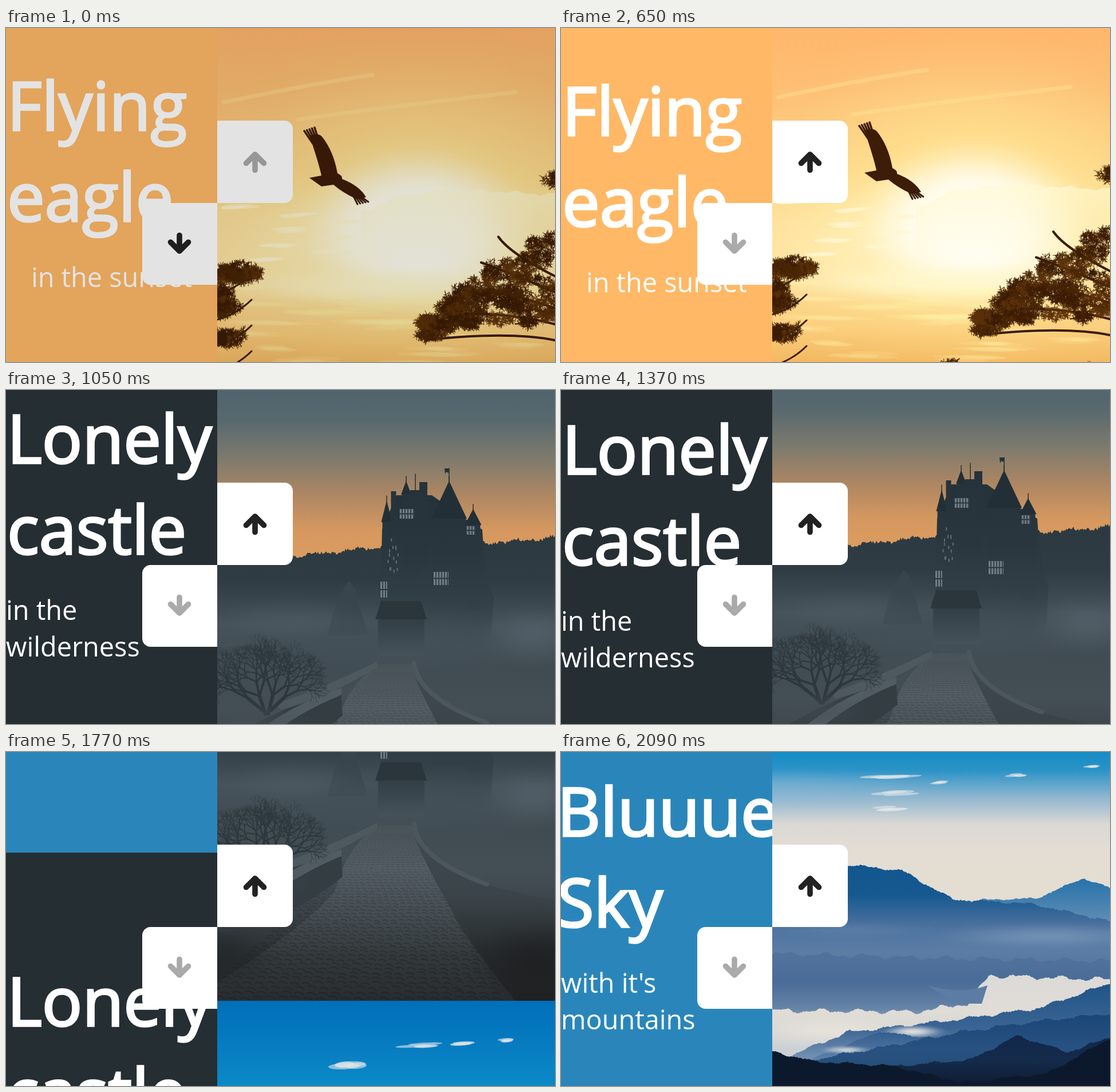
Recreate the animation shown at these times as an HTML page with a canvas. Size 959 by 584 pixels, loop 2.17 s.

```html
<!DOCTYPE html>
<html lang="en">
<head>
<meta charset="utf-8">
<title>Double vertical slider</title>
<style>
  * { box-sizing: border-box; margin: 0; padding: 0; }
  html, body { width: 100%; height: 100%; overflow: hidden; }
  body { font-family: "Open Sans", sans-serif; }
  #stage { position: absolute; inset: 0; overflow: hidden; background: #252e33; }
  .side { position: absolute; top: 0; height: 584px; overflow: hidden; }
  #left { left: 0; width: 369px; }
  #right { left: 369px; width: 590px; }
  .track { position: absolute; left: 0; top: -156px; width: 100%; }
  .panel {
    position: absolute; top: calc(var(--i) * -923px); width: 369px; height: 923px; color: #fff;
    display: flex; flex-direction: column; align-items: center; justify-content: center;
  }
  h1 {
    position: relative; left: 2px; top: -1.8px;
    font-size: 117px; font-weight: 400; line-height: 159px;
    margin: -87.75px 0 29.25px; -webkit-text-stroke: 3.66px #fff;
  }
  p { font-size: 46.8px; line-height: 64px; }
  canvas { display: block; width: 590px; height: 923px; }
  .btn {
    position: absolute; width: 131.5px; height: 143.5px; background: #fff;
    display: flex; align-items: center; justify-content: center;
  }
  #up { left: 369px; top: 162px; border-radius: 0 14.6px 14.6px 0; }
  #down { left: 237.7px; top: 305.5px; border-radius: 14.6px 0 0 14.6px; }
  #down svg { transform: scaleY(-1); }
  .btn svg {
    width: 42px; height: 42px; fill: none; stroke: currentColor;
    stroke-width: 9.6px; stroke-linecap: round; stroke-linejoin: round;
  }
  #shade { position: absolute; inset: 0; background: #000; opacity: .11; }
</style>
</head>
<body>
<div id="stage">
  <div class="side" id="left"><div class="track">
    <div class="panel" style="--i:0;background:#ffb866"><h1>Flying eagle</h1><p>in the sunset</p></div>
    <div class="panel" style="--i:1;background:#252e33"><h1>Lonely castle</h1><p>in the wilderness</p></div>
    <div class="panel" style="--i:2;background:#2a86ba"><h1>Bluuue Sky</h1><p>with it's mountains</p></div>
  </div></div>
  <div class="side" id="right"><div class="track">
    <canvas width="590" height="923"></canvas>
    <canvas width="590" height="923"></canvas>
    <canvas width="590" height="923"></canvas>
  </div></div>
  <div class="btn" id="down"><svg viewBox="-21 -21 42 42"><use href="#arrow"/></svg></div>
  <div class="btn" id="up"><svg viewBox="-21 -21 42 42"><path id="arrow" d="M-15.500 2.500 0-13 15.500 2.500M0-12V14.500"/></svg></div>
  <div id="shade"></div>
</div>
<script>
const $ = s => document.querySelector(s);
const TOP = -156, H = 923, BOTTOM = TOP + H, L = 369, R = 959, LOOP = 2170;

// ---- drawing helpers (all scenes use stage coordinates) ----
let c, seed;
const rnd = () => (seed = (seed * 16807) % 2147483647) / 2147483647;
const spread = a => (rnd() * 2 - 1) * a;
const between = (a, b) => a + rnd() * (b - a);
const times = (n, f) => { for (let i = 0; i < n; i++) f(i); };

// Vertical gradient with evenly spaced colours
function vgrad(y0, y1, ...cols) {
  const g = c.createLinearGradient(0, y0, 0, y1);
  cols.forEach((col, i) => g.addColorStop(i / (cols.length - 1), col));
  return g;
}

function fill(path, col) {
  c.fillStyle = col;
  c.fill(new Path2D(path));
}

function stroke(path, col, w) {
  c.strokeStyle = col;
  c.lineWidth = w;
  c.stroke(new Path2D(path));
}

function glow(x, y, rx, ry, rgb, a) {
  c.save();
  c.translate(x, y);
  c.scale(rx, ry);
  const g = c.createRadialGradient(0, 0, 0, 0, 0, 1);
  times(9, i => g.addColorStop(i / 8, `rgba(${rgb},${a * (1 + Math.cos(Math.PI * i / 8)) / 2})`));
  c.fillStyle = g;
  c.fillRect(-1, -1, 2, 2);
  c.restore();
}

// Land below a line through key points "x,y", roughened by waves and jitter
function ridge(keys, col, wave = 2, jitter = 1, base = BOTTOM) {
  const pts = keys.split(' ').map(p => p.split(',').map(Number));
  const phase = rnd() * 9;
  c.beginPath();
  c.moveTo(pts[0][0], base);
  for (let i = 0, x = pts[0][0]; x <= R + 2; x += 2) {
    while (i < pts.length - 2 && x > pts[i + 1][0]) i++;
    const [x0, y0] = pts[i], [x1, y1] = pts[i + 1], k = (x - x0) / (x1 - x0);
    const bump = Math.sin(x * .09 + phase) + Math.sin(x * .21 + phase * 2) * .6;
    c.lineTo(x, y0 + (y1 - y0) * k + bump * wave + spread(jitter));
  }
  c.lineTo(R + 2, base);
  c.fillStyle = col;
  c.fill();
}

// Wispy cloud
function wisp(x, y, rx, ry, col, tilt = -.05) {
  times(4, () => {
    c.beginPath();
    c.ellipse(x + spread(rx * .4), y + spread(ry * .5), rx * between(.4, .7), ry * .5, tilt, 0, 7);
    c.fillStyle = col;
    c.fill();
  });
}

// Clumps of needles scattered between two height curves
function foliage(x0, x1, top, bottom, clumps) {
  times(clumps, () => {
    const cx = between(x0, x1), cy = between(top(cx), bottom(cx));
    c.beginPath();
    times(24, () => {
      const a = rnd() * 6.283, r = Math.sqrt(rnd());
      const px = cx + Math.cos(a) * r * 17, py = cy + Math.sin(a) * r * 10;
      times(7, () => {
        const b = rnd() * 6.283, l = between(3, 8);
        c.moveTo(px, py);
        c.lineTo(px + Math.cos(b) * l, py + Math.sin(b) * l);
      });
    });
    c.strokeStyle = ['#4a2606', '#3c1c04', '#5c310b'][Math.floor(rnd() * 3)];
    c.lineWidth = .9;
    c.stroke();
  });
}

function branch(x, y, ang, len, w) {
  const x2 = x + Math.cos(ang) * len, y2 = y + Math.sin(ang) * len;
  stroke(`M${x} ${y}L${x2} ${y2}`, '#2d373d', w);
  if (len < 7) return;
  const n = rnd() < .3 ? 3 : 2;
  times(n, i => branch(x2, y2, ang + (i - (n - 1) / 2) * .75 + spread(.25), len * between(.68, .86), w * .68));
}

// ---- scenes ----
function sunset() {
  c.fillStyle = vgrad(0, 640, '#ffb56c', '#fdbe73', '#fdcd80', '#fedc94', '#ffe3a0', '#fbcd7c', '#eda94c');
  c.fillRect(L, TOP, R - L, H);
  glow(720, 320, 430, 330, '255,232,150', .9);
  glow(700, 385, 430, 150, '255,246,200', .9);
  times(2, () => glow(720, 350, 220, 160, '255,255,248', 1));

  // long streaks, then the cloud bank in front of the sun
  times(2, i => stroke(`M${380 + i * 130} ${130 + i * 30}q140 ${-30 + i * 10} ${260 + i * 120} -48`, 'rgba(255,228,150,.4)', 7));
  ridge('620,322 690,292 790,282 870,287 959,291', vgrad(280, 420, 'rgba(255,250,215,.7)', 'rgba(255,240,180,0)'), 2, 1, 420);
  times(8, i => wisp(L + 40 + (i * 97) % 210, 314 + i * 13, 40, 6, 'rgba(255,248,212,.5)'));
  times(26, () => wisp(between(400, 900), between(440, 590), between(50, 110), 7, 'rgba(255,238,170,.16)', .03));
  glow(640, 452, 330, 40, '255,248,205', .8);

  ridge('369,656 620,655 760,665 959,668', vgrad(650, 725, '#d79a48', '#b5702a', '#94501a'), 3, 4);
  ridge('369,698 540,700 600,676 650,690 959,694', vgrad(670, BOTTOM, '#a5642a', '#8c4a15', '#6f3609'), 3, 2);

  // right-hand pine: boughs reach in from the edge
  times(5, i => stroke(`M959 ${546 - i * 28}Q880 ${530 - i * 34} ${740 + i * 30} ${545 - i * 45}`, '#3b1c05', 4));
  times(3, i => stroke(`M959 ${670 - i * 22}Q${850 + i * 20} ${630 - i * 8} ${670 + i * 90} ${612 - i * 4}`, '#3b1c05', 4));
  stroke('M890 660Q830 680 780 734', '#3b1c05', 3);
  const inward = x => (R - x) / 235;
  foliage(728, R, x => 355 + 165 * inward(x) ** 1.3, x => 512 + 30 * inward(x), 105);
  foliage(952, 965, () => 262, () => 272, 3);
  foliage(665, R, x => 596 + 18 * Math.sin(inward(x) * 2.6), x => 666 - 34 * inward(x), 72);
  foliage(770, 795, () => 730, () => 738, 3);
  foliage(930, R, () => 740, () => BOTTOM, 10);

  // left-hand pine and bush
  times(4, i => stroke(`M369 ${465 + i * 45}q35 -10 60 -35`, '#3b1c05', 3));
  [[430, 78], [465, 30], [492, 42], [543, 52], [628, 58]].forEach(([y, w]) =>
    foliage(L, L + w - 14, () => y - 13, () => y + 9, w / 4.5));
  foliage(L, 460, () => 697, x => BOTTOM - (x - L) * .2, 40);

  // eagle: body and wings, then fanned wing-tip feathers
  const bird = '#3d1c08';
  fill('M530 188Q545 182 552 190 572 215 579 254 588 258 587 264 618 276 629 296L612 299Q588 288 572 274L551 277 530 262 551 258Q546 235 530 188Z', bird);
  times(5, i => {
    stroke(`M${536 + i * 3} 202L${521 + i * 4.500} ${180 - i * 1.500}`, bird, 3.5);
    stroke(`M${607 + i * 3} 294L${614 + i * 4.700} ${308 - i}`, bird, 3);
  });
}

function tower(x, y, w, roof, h = 150) {
  const wall = vgrad(130, 400, '#26323a', '#2a363d', '#38444b');
  fill(`M${x - w / 2} ${y}h${w}v${h}h${-w}z`, wall);
  if (!roof) return;
  fill(`M${x - w / 2 - 2} ${y}h${w + 4}L${x} ${y - roof}z`, '#232f36');
  stroke(`M${x} ${y - roof + 4}v-12`, '#26323a', 1.5);
}

function lattice(x, y, w, h) {
  c.fillStyle = '#6f7c84';
  c.fillRect(x, y, w, h);
  for (let k = 0; k <= w; k += 5) stroke(`M${x + k} ${y}v${h}`, '#2a363d', 1.6);
  stroke(`M${x} ${y + h / 2}h${w}`, '#2a363d', 2);
}

function castle() {
  c.fillStyle = vgrad(TOP, 290, '#2c4d65', '#415a69', '#4f636d', '#58696e', '#7c7a6d', '#ac8663', '#d6985f', '#dd9d60');
  c.fillRect(L, TOP, R - L, H);
  ridge('369,274 500,271 650,256 850,248 959,239',
    vgrad(240, BOTTOM, '#2c3940', '#303c43', '#46525a', '#404b52', '#444e55', '#3a4246', '#292d30', '#222527'), 2, 3);

  fill('M598 315Q612 322 616 355L632 410H562Q572 355 598 315z', '#39454c');
  fill('M657 225L682 165H744L800 205 832 225Q836 300 852 345L846 430H652z', vgrad(165, 430, '#26323a', '#2a363d', '#323e45', '#434f56'));
  tower(665, 212, 15, 38, 45);
  tower(677, 158, 9, 0, 60);
  tower(699, 164, 14, 24);
  tower(715, 156, 18, 0);
  tower(729, 142, 14, 0);
  tower(774, 206, 58, 66);
  tower(816, 217, 25, 28);
  stroke('M774 145V118M715 158V128', '#26323a', 1.5);
  fill('M766 118h9l-2 8-4-2-2 4z', '#26323a');
  lattice(687, 189, 26, 17);
  lattice(746, 299, 27, 23);
  lattice(804, 219, 16, 15);
  lattice(653, 316, 13, 28);
  times(14, () => stroke(`M${between(666, 690)} ${between(240, 300)}v4`, '#5f6c73', 2));
  glow(690, 425, 330, 75, '68,80,88', .9);
  fill('M655 350H725L735 382H645z', '#2b363c');
  fill('M650 382H731V445H650z', vgrad(382, 445, '#333f46', '#465259'));
  glow(920, 410, 110, 60, '96,110,120', .4);
  glow(500, 385, 170, 45, '84,97,105', .35);

  // road narrowing towards the gate, with cobbles in perspective
  fill('M650 460H712Q725 520 768 575 775 640 900 767H369V735Q520 640 575 575 592 500 650 460z',
    vgrad(460, BOTTOM, '#485259', '#535d63', '#464e53', '#33383b', '#282c2f'));
  for (let y = 475; y < BOTTOM; y += 3 + (y - 470) / 48) {
    const k = (y - 460) / 300;
    for (let x = 651 - k * 310 + rnd() * 9; x < 715 + k * 150; x += 5 + k * 17)
      stroke(`M${x} ${y + spread(2 * k)}q${1.5 + k * 6} ${-4 * k} ${3 + k * 12} ${3 * k}`,
        `rgba(26,31,34,${.12 + k * .35})`, .8 + k * 1.4);
  }

  // parapets on both sides
  fill('M369 600Q490 530 585 505L588 550Q490 630 369 650z', '#343d42');
  fill('M430 585Q500 530 586 502V514Q510 545 455 590z', '#515c62');
  fill('M470 530Q560 500 648 456V466Q560 520 480 540z', '#4e595f');
  fill('M712 480Q760 560 959 590V767H890Q790 650 712 480z', vgrad(500, BOTTOM, '#3e484e', '#3a4348', '#282c2e', '#1f2122'));
  stroke('M713 458Q720 520 840 563', '#4c565d', 8);
  glow(930, 700, 140, 90, '28,30,31', .7);
  glow(L, 690, 110, 70, '34,39,42', .7);

  times(4, i => branch(448 + i * 5, 550 - Math.abs(i - 1.5) * 6, -2.45 + i * .56, 33, 6));
  glow(440, 560, 110, 40, '68,78,84', .5);
}

function mountains() {
  c.fillStyle = vgrad(TOP, 220, '#006fba', '#0376be', '#087fc2', '#0a88c5', '#2b93c7', '#8fb6cf', '#dad8d5', '#e3ddd3', '#e4ddd2');
  c.fillRect(L, TOP, R - L, H);
  glow(L, 65, 350, 45, '140,185,214', .4);
  const white = 'rgba(226,230,234,.6)';
  wisp(606, -47, 40, 11, white);
  times(3, i => wisp(728 + i * 75, -78 - i * 4, 48 - i * 14, 5, white));
  times(3, i => wisp(566 + i * 8, 45 + i * 27, 66 - i * 12, 5, white));
  times(3, i => wisp(660 + i * 135, 54 - i * 14, 20, 4, white));

  ridge('735,258 830,256 913,221 959,238', vgrad(220, 310, '#2472aa', '#6c91b7'), 1);
  ridge('369,222 500,197 595,207 685,258 820,265 959,296',
    vgrad(200, 500, '#12578f', '#165990', '#486f9d', '#5c7ea5', '#4c6e99', '#6c89aa', '#d8d8d6'), 1.5);
  glow(850, 322, 240, 28, '130,158,190', .6);
  glow(500, 312, 190, 18, '105,137,174', .4);
  ridge('369,352 640,360 959,365', vgrad(340, 480, 'rgba(67,101,148,.5)', 'rgba(67,101,148,0)'), 3);

  // valley fog
  ridge('369,452 620,454 710,440 748,391 959,398', vgrad(390, 520, '#dcdad8', '#e0dcd6', '#ccd0d5'), 3, 1, 600);
  fill('M640 408Q700 425 745 408L735 440 690 440z', '#5d7ca4');
  glow(480, 488, 180, 35, '236,230,220', .7);

  // nearer hills, each darker than the one behind
  ridge('395,533 500,490 690,468 835,448 959,404', vgrad(405, 560, '#1f5488', '#3b6493', '#8ea6c2'));
  glow(615, 489, 65, 14, '230,228,226', .95);
  ridge('430,540 556,489 690,506 959,540', vgrad(485, 555, '#2d5989', '#6d8db2'), 1);
  glow(498, 521, 50, 9, '222,224,226', .85);
  ridge('400,545 540,520 700,489 830,471 959,457', vgrad(458, 584, '#1a4677', '#285281', '#244870'));
  ridge('575,550 715,538 797,496 885,525 959,499', vgrad(496, 584, '#11284c', '#152b4b', '#0d1b33'), 1.5);
  ridge('369,523 440,541 580,549 700,578 850,562 959,500', '#0c192c', 1.5);
}

[sunset, castle, mountains].forEach((scene, i) => {
  c = document.querySelectorAll('canvas')[i].getContext('2d');
  c.translate(-L, -TOP);
  c.lineCap = c.lineJoin = 'round';
  seed = 77 + i * 334;
  scene();
});

// ---- motion ----
function easeInOut(x) {
  if (x <= 0) return 0;
  if (x >= 1) return 1;
  let lo = 0, hi = 1, s;
  times(24, () => {
    s = (lo + hi) / 2;
    const bx = 1.26 * s * (1 - s) ** 2 + 1.74 * s * s * (1 - s) + s ** 3;
    if (bx < x) lo = s; else hi = s;
  });
  return s * s * (3 - 2 * s);
}

const leftTrack = $('#left .track'), rightTrack = $('#right .track');

function render(now) {
  const time = now % LOOP;
  // the picture advances in 80 ms steps
  const t = time < 490 ? 0 : 490 + Math.floor((time - 490) / 80) * 80;
  const shift = Math.round(H * (easeInOut((t - 615.5) / 484) + easeInOut((t - 1573.5) / 471)));
  leftTrack.style.transform = `translateY(${shift}px)`;
  rightTrack.style.transform = `translateY(${-shift}px)`;
  const upActive = t >= 570;
  $('#up').style.color = upActive ? '#222' : '#aaa';
  $('#down').style.color = upActive ? '#aaa' : '#222';
  $('#shade').style.display = time < 80 ? 'block' : 'none';
}

function tick(now) {
  render(now);
  requestAnimationFrame(tick);
}
render(0);
requestAnimationFrame(tick);
</script>
</body>
</html>
```
